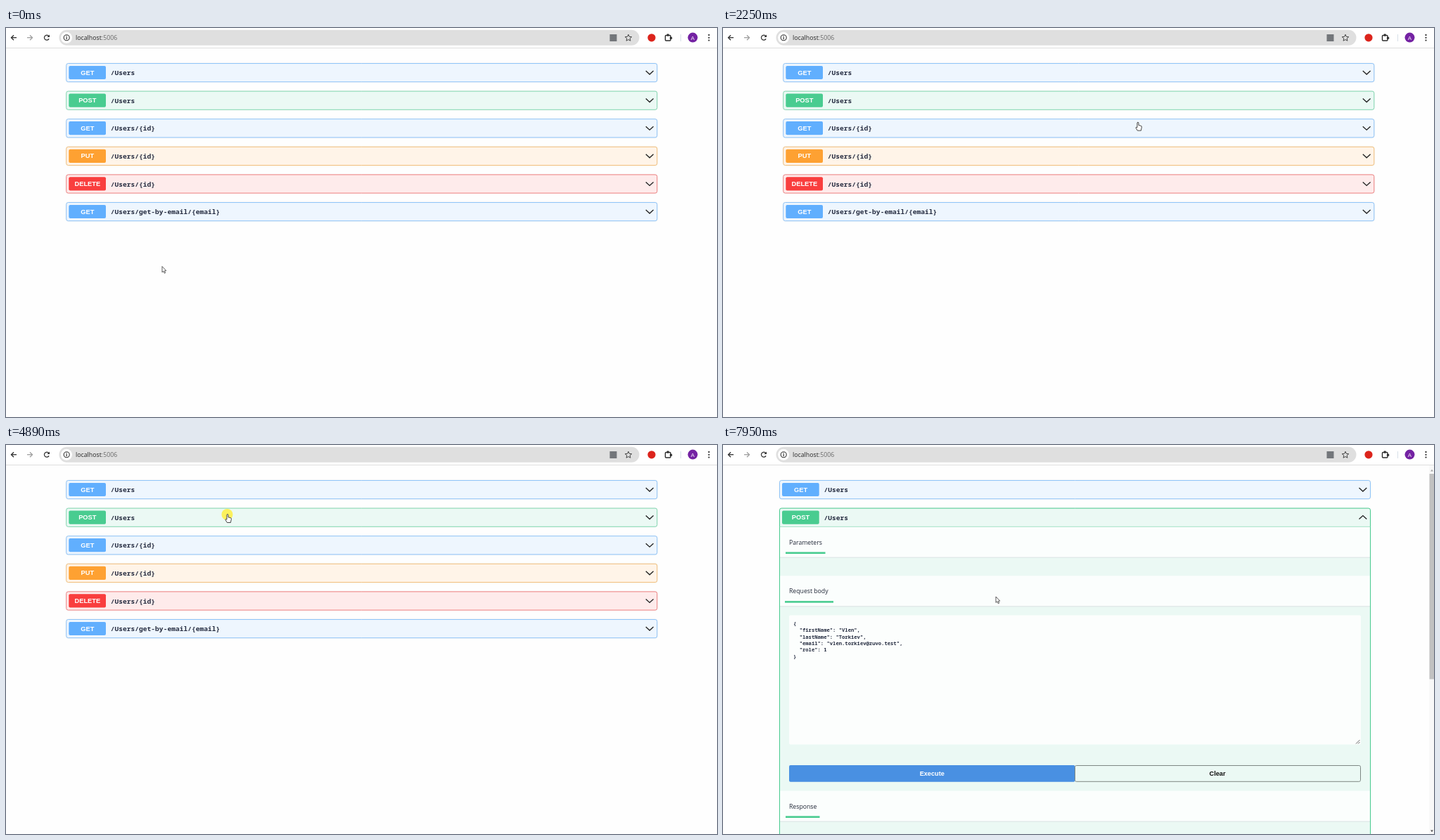
These frames come from a looping animation (1011 px wide and 554 px high, 8000 ms). An HTML page with a canvas:

```html
<!DOCTYPE html>
<html lang="en">
<head>
<meta charset="utf-8">
<title>API page</title>
<style>
html, body { margin: 0; width: 100%; height: 100%; overflow: hidden; background: #fefefe; }
canvas { display: block; width: 1011px; height: 554px; }
</style>
</head>
<body>
<canvas id="stage"></canvas>
<script>
const W = 1011, H = 554, LOOP = 8000;
const canvas = document.getElementById('stage');
const c = canvas.getContext('2d');
const dpr = window.devicePixelRatio || 1;
canvas.width = W * dpr;
canvas.height = H * dpr;

const UI = '"Open Sans", "Noto Sans", sans-serif';
const ARIAL = '"Liberation Sans", Arial, sans-serif';
const MONO = '"Noto Sans Mono", "DejaVu Sans Mono", monospace';
const INK = '#252c40', PLUM = '#7c4466';

const METHODS = {
  GET: { main: '#61affe', bg: '#eef6fe', edge: '#8fc4f8' },
  POST: { main: '#49cc90', bg: '#ebf9f4', edge: '#82d8b1' },
  PUT: { main: '#fea132', bg: '#fff4e8', edge: '#f3c07c' },
  DELETE: { main: '#f93e3e', bg: '#feebeb', edge: '#f08080' }
};
const ROWS = [
  ['GET', '/Users'], ['POST', '/Users'], ['GET', '/Users/{id}'],
  ['PUT', '/Users/{id}'], ['DELETE', '/Users/{id}'],
  ['GET', '/Users/get-by-email/{email}']
];
const ROW_TOP = 50.5, ROW_STEP = 39.6, ROW_H = 26.2;
const BODY = [
  '{',
  '  "firstName": "Vlen",',
  '  "lastName": "Torkiev",',
  '  "email": "vlen.torkiev@zuvo.test",',
  '  "role": 1',
  '}'
];

// Pointer moves: start, end, steps, x, y
const START = [222, 339.5];
const MOVES = [
  [70, 410, 6, 155, 108], [477, 810, 6, 372, 96],
  [880, 1230, 6, 604, 137], [1360, 1650, 5, 617, 134.5],
  [2110, 2800, 10, 334, 130.5], [3410, 3550, 3, 334, 139.5],
  [4480, 4820, 6, 315, 98.5], [5820, 6500, 10, 444.5, 436.5],
  [6570, 6570, 1, 454.5, 445], [6640, 7130, 8, 461, 466],
  [7460, 7950, 8, 388, 216]
];
const CLICKS = [[1650, 1720], [3750, 3880], [4280, 4410], [4890, 5020], [7200, 7330]];

const within = (t, a, b) => t >= a && t < b;

function rect(x, y, w, h, fill) {
  c.fillStyle = fill;
  c.fillRect(x, y, w, h);
}

function box(x, y, w, h, r, fill, stroke, lw = 1) {
  c.beginPath();
  c.roundRect(x, y, w, h, r);
  if (fill) { c.fillStyle = fill; c.fill(); }
  if (stroke) { c.strokeStyle = stroke; c.lineWidth = lw; c.stroke(); }
}

function disc(x, y, r, fill) {
  c.beginPath();
  c.arc(x, y, r, 0, 7);
  c.fillStyle = fill;
  c.fill();
}

function line(points, color, lw = 1, fill) {
  c.beginPath();
  points.forEach(([x, y]) => c.lineTo(x, y));
  if (fill) { c.closePath(); c.fillStyle = fill; c.fill(); }
  if (lw) { c.strokeStyle = color; c.lineWidth = lw; c.stroke(); }
}

function text(s, x, y, font, color, align = 'left') {
  c.font = font;
  c.fillStyle = color;
  c.textAlign = align;
  c.fillText(s, x, y);
}

function drawToolbar() {
  rect(0, 0, W, 28, '#fff');
  rect(0, 28, W, 1, '#dedede');
  for (const [x, dir, color] of [[11, 1, '#303030'], [34, -1, '#a0a0a0']]) {
    line([[x + 4 * dir, 13.7], [x - 3.5 * dir, 13.7]], color, 1.3);
    line([[x, 10.2], [x - 3.5 * dir, 13.7], [x, 17.2]], color, 1.3);
  }
  c.beginPath();
  c.arc(58, 13.7, 3.5, 0.5, 5.6);
  c.strokeStyle = '#303030';
  c.lineWidth = 1.3;
  c.stroke();
  line([[62, 9.5], [62, 13], [58.5, 13]], '', 0, '#303030');

  box(75.5, 2.8, 825, 22, 11, '#dfdfdf');
  disc(86, 13.8, 8, '#fff');
  c.beginPath();
  c.arc(86.2, 13.8, 4, 0, 7);
  c.strokeStyle = '#333';
  c.lineWidth = 1.1;
  c.stroke();
  rect(85.6, 13, 1.2, 3.2, '#333');
  rect(85.6, 11.2, 1.2, 1.2, '#333');
  text('localhost', 99, 17, '8.8px ' + UI, '#252525');
  const host = c.measureText('localhost').width;
  text(':5006', 99 + host, 17, '8.8px ' + UI, '#6a6a6a');

  rect(858.5, 9, 10, 10, '#73767a');
  const star = [];
  for (let i = 0; i < 11; i++) {
    const a = i * Math.PI / 5 - Math.PI / 2, r = i % 2 ? 2.3 : 5;
    star.push([885 + r * Math.cos(a), 14.2 + r * Math.sin(a)]);
  }
  line(star, '#454545', 1);
  disc(918, 13.8, 5.6, '#dc241c');
  box(937.5, 10.5, 7.5, 7.5, 1, null, '#2b2b2b', 1.4);
  disc(941.2, 10, 1.7, '#2b2b2b');
  disc(945.6, 14.2, 1.7, '#2b2b2b');
  rect(959, 9, 1, 10, '#d8dfe8');
  disc(976.5, 13.6, 7, '#7422a3');
  text('A', 976.5, 16.6, '8px ' + ARIAL, '#f0e4f6', 'center');
  for (const y of [10, 13.8, 17.6]) disc(999.5, y, 1.15, '#333');
}

function drawRow(x, y, [method, path], height, open) {
  const m = METHODS[method];
  c.save();
  c.shadowColor = 'rgba(0,0,0,.14)';
  c.shadowBlur = 2;
  box(x, y, 840, height, 2.7, m.bg);
  c.restore();
  box(x, y, 840, height, 2.7, null, open ? m.main : m.edge);
  box(x + 3.5, y + 3.4, 52.7, 19.2, 2, m.main);
  text(method, x + 30, y + 16, 'bold 9.3px ' + ARIAL, '#fff', 'center');
  text(path, x + 63, y + 16.6, 'bold 9.6px ' + MONO, INK);
  const d = open ? -2.5 : 2.5;
  line([[x + 824, y + 13 - d], [x + 829.4, y + 13 + d], [x + 834.8, y + 13 - d]], '#222', 1.35);
}

function drawTab(x, y, label, color, lineX, lineW) {
  rect(x + 0.5, y, 839, 43.5, 'rgba(255,255,255,.82)');
  rect(x + 0.5, y + 43, 839, 1, 'rgba(59,65,81,.13)');
  text(label, x + 13.5, y + 25, '8.7px ' + UI, '#222838');
  rect(lineX, y + 35.8, lineW, 2.6, color);
}

function drawGetPanel(x, y) {
  rect(x, y + ROW_H - 0.4, 840, 1, METHODS.GET.edge);
  drawTab(x, y + 26.8, 'Parameters', METHODS.GET.main, 94, 56.5);
  text('id', 99, 224.5, 'bold 10.2px ' + UI, INK);
  text('* required', 112, 220.3, '6.4px ' + UI, '#f33');
  text('int', 99, 236.8, 'bold 7.2px ' + MONO, INK);
  box(159.5, 214.5, 237, 23.5, 2.5, '#fff', '#d9dde2');
  text('id', 166, 230, '10px ' + UI, '#777');
  drawExecute(99, 266.5, 813);
}

function drawExecute(x, y, w) {
  box(x, y, w, 23.8, 2, '#4990e2');
  text('Execute', x + w / 2, y + 14.7, 'bold 9.2px ' + ARIAL, '#fff', 'center');
}

function drawPostPanel(x, y, done) {
  const { main, edge } = METHODS.POST;
  rect(x, y + ROW_H - 0.4, 840, 1, edge);
  drawTab(x, y + 26.5, 'Parameters', main, 89, 56.5);
  drawTab(x, 186.3, 'Request body', main, 88, 69);
  box(94, 242.5, 813, 184, 2, 'rgba(255,255,255,.85)');
  BODY.forEach((s, i) => text(s, 100, 256.8 + i * 9.4, '600 7.2px ' + MONO, INK));
  line([[900, 425.5], [905.5, 420]], '#555', 0.9);
  line([[903, 425.5], [905.5, 423]], '#555', 0.9);
  if (!done) {
    drawExecute(94, 456, 813);
    return;
  }
  drawExecute(94, 456, 406.5);
  box(500.5, 456.5, 406, 22.8, 2, null, '#7d8783');
  text('Clear', 703, 470.7, 'bold 9.2px ' + ARIAL, '#111', 'center');
  drawTab(x, 492.6, 'Response', main, 89, 48.5);
}

function drawScrollbar(thumbEnd) {
  rect(1004, 29, 7, H - 29, '#f8f8f8');
  rect(1004.5, 41, 6.5, thumbEnd - 41, '#c1c1c1');
  line([[1006, 37.5], [1008, 34.8], [1010, 37.5]], '', 0, '#a5a5a5');
  line([[1006, 548.5], [1008, 551.2], [1010, 548.5]], '', 0, '#505050');
}

function drawDialog() {
  c.save();
  c.shadowColor = 'rgba(0,0,0,.4)';
  c.shadowBlur = 4;
  c.shadowOffsetY = 1;
  box(358.7, 26.5, 294, 136.8, 6, '#fef8fe');
  c.restore();
  text('Включить режим активного курсора?', 371.5, 51.5, '600 9.7px ' + UI, '#26202a');
  text('Вы сможете использовать курсор для навигации по страницам.', 371.5, 70.5, '8px ' + UI, '#3d373f');
  text('Нажмите F7, чтобы отключить эту функцию.', 371.5, 83.5, '8px ' + UI, '#3d373f');
  box(372, 95.7, 9.8, 9.6, 1, null, '#6a4a60', 1.3);
  text('Больше не спрашивать', 390, 103.4, '7.3px ' + UI, '#3d373f');
  box(509.7, 123.6, 65, 28.8, 14.4, '#fff', PLUM, 1.4);
  box(511.7, 125.6, 61, 24.8, 12.4, PLUM);
  text('Включить', 542, 141, '600 7.7px ' + UI, '#fff', 'center');
  box(578.7, 125.7, 61, 24.4, 12.2, '#fef8fe', '#efcee2');
  text('Отмена', 609, 141, '600 7.6px ' + UI, '#895775', 'center');
}

function pointerAt(t) {
  let [x, y] = START;
  for (const [t0, t1, n, tx, ty] of MOVES) {
    if (t < t0) break;
    const k = t >= t1 ? n : 1 + Math.floor((t - t0) / (t1 - t0) * (n - 1) + 1e-6);
    const p = (1 - Math.cos(Math.PI * k / n)) / 2;
    x += (tx - x) * p;
    y += (ty - y) * p;
  }
  return [x, y];
}

function drawArrow(x, y) {
  line([[0, 0], [0, 8.4], [1.9, 6.8], [3.3, 9.8], [4.7, 9.1], [3.4, 6.3], [5.8, 6.1]]
    .map(([dx, dy]) => [x + dx, y + dy]).concat([[x, y]]), '#333', 0.8, '#fff');
}

function drawHand(x, y) {
  c.save();
  c.translate(x, y);
  c.beginPath();
  c.moveTo(-1, 0.8);
  c.quadraticCurveTo(0, -1, 1, 0.8);
  c.lineTo(1, 4.4);
  c.lineTo(3.8, 5);
  c.quadraticCurveTo(5.6, 5.4, 5.4, 7);
  c.lineTo(4.4, 12);
  c.lineTo(-0.6, 12);
  c.lineTo(-3, 8);
  c.quadraticCurveTo(-3.2, 6.6, -1, 7.6);
  c.closePath();
  c.fillStyle = '#fff';
  c.fill();
  c.strokeStyle = '#333';
  c.lineWidth = 0.9;
  c.stroke();
  c.restore();
}

function drawBeam(x, y) {
  line([[x, y - 4.5], [x, y + 4.5]], '#222', 1);
  for (const d of [-5, 5]) line([[x - 2, y + d], [x + 2, y + d]], '#222', 0.9);
}

function drawPointer(t, tops, dialog, post) {
  const [x, y] = pointerAt(t);
  if (CLICKS.some(([a, b]) => within(t, a, b))) disc(x - 0.5, y + 0.5, 8, 'rgba(255,238,50,.78)');
  const overDialog = dialog && within(x, 358, 654) && y < 164;
  const overRow = x > 80 && tops.some(top => within(y, top, top + ROW_H));
  const overButton = post && within(y, 456, 480);
  if (!overDialog && (overRow || overButton)) drawHand(x, y);
  else if (post && within(y, 242, 427)) drawBeam(x, y);
  else drawArrow(x, y);
}

function draw(t) {
  const dialog = within(t, 410, 1720);
  const getOpen = within(t, 3880, 4410);
  const post = t >= 5020, done = t >= 7330;
  const left = post ? 80.5 : 85.8;
  const tops = [];

  c.setTransform(dpr, 0, 0, dpr, 0, 0);
  rect(0, 0, W, H, '#fefefe');
  let shift = 0;
  ROWS.forEach((row, i) => {
    const y = ROW_TOP + i * ROW_STEP + shift;
    const open = (getOpen && i === 2) || (post && i === 1);
    const extra = !open ? 0 : getOpen ? 147.4 : done ? 600 : 376.3;
    tops.push(y);
    if (y < H) drawRow(left, y, row, ROW_H + extra, open);
    if (open && getOpen) drawGetPanel(left, y);
    if (open && post) drawPostPanel(left, y, done);
    shift += extra;
  });
  drawToolbar();
  if (post) drawScrollbar(done ? 333.5 : 455);
  if (dialog) drawDialog();
  drawPointer(t, tops, dialog, post);
}

const begin = performance.now();
function tick() {
  draw((performance.now() - begin) % LOOP);
  requestAnimationFrame(tick);
}
tick();
</script>
</body>
</html>
```
